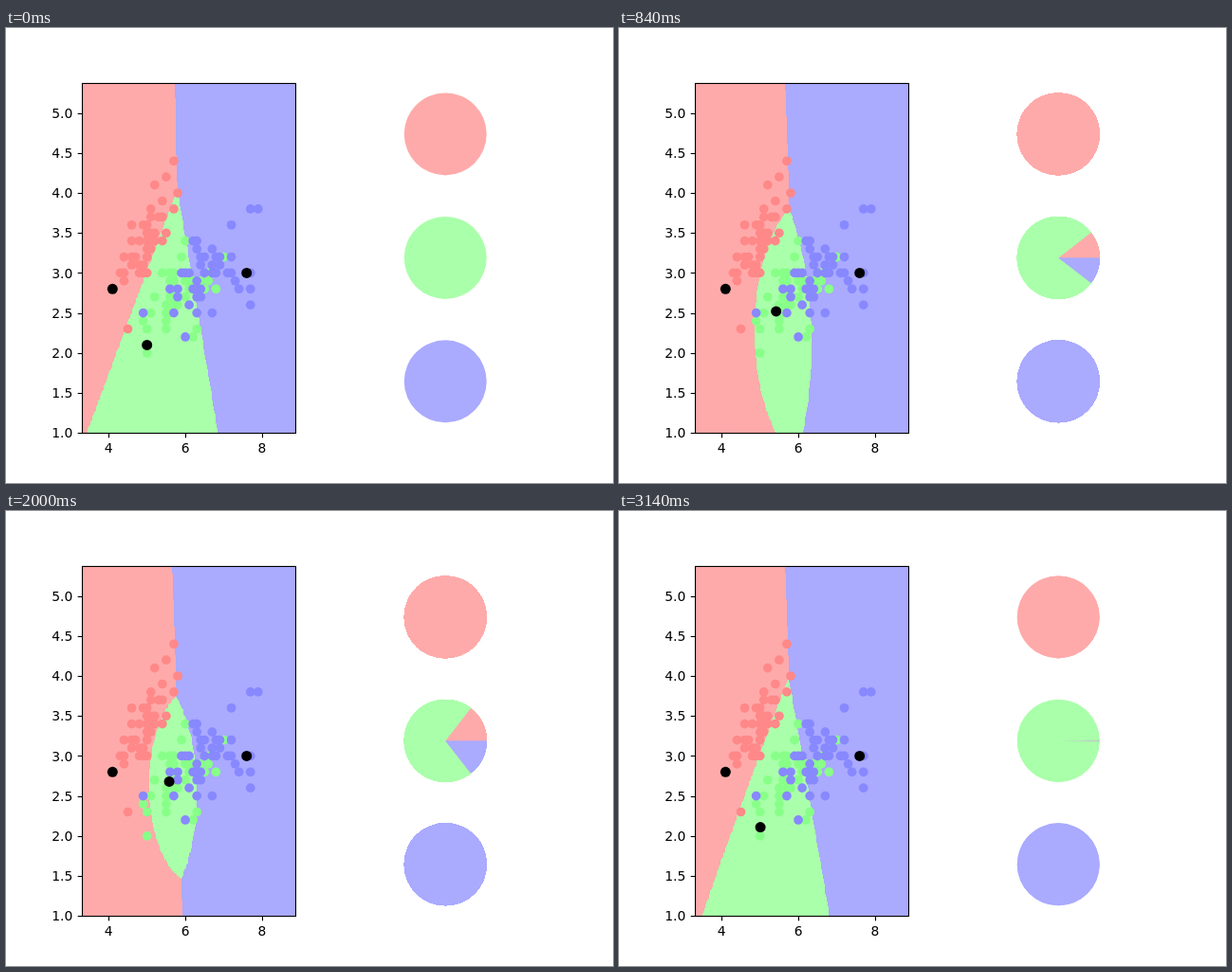
Animation, 640 px wide and 480 px high, one loop 3.16 s. Source, as an HTML page with a canvas:

```html
<!DOCTYPE html>
<html lang="en">
<head>
<meta charset="utf-8">
<title>Soft-label prototypes on iris</title>
<style>
  html, body { margin: 0; width: 100%; height: 100%; overflow: hidden; background: #fff; }
  canvas { display: block; }
</style>
</head>
<body>
<canvas id="stage" width="640" height="480"></canvas>
<script>
const ctx = document.getElementById('stage').getContext('2d');

const LOOP = 3160, STEP = 20, FRAMES = LOOP / STEP;
const LIGHT = ['#ffaaaa', '#aaffaa', '#aaaaff'];
const STRONG = ['#ff8888', '#88ff88', '#8888ff'];

// Plot area in pixels and in data units
const AREA = { x: 80, y: 57.6, w: 225.45, h: 369.6 };
const X0 = 3.3, Y0 = 1, CELL = 0.02, COLS = 279, ROWS = 219;
const px = x => AREA.x + (x - X0) * AREA.w / (COLS * CELL);
const py = y => AREA.y + AREA.h - (y - Y0) * AREA.h / (ROWS * CELL);
const snap = v => Math.round(v) + 0.5;

// Iris sepals in tenths of a centimetre, per species: width -> lengths
const SPECIES = [
  {
    23: [45], 29: [44], 30: [43, 44, 48, 49, 50], 31: [46, 48, 49], 32: [44, 46, 47, 50],
    33: [50, 51], 34: [46, 48, 50, 51, 52, 54], 35: [50, 51, 52, 55], 36: [46, 49, 50],
    37: [51, 53, 54], 38: [51, 57], 39: [54], 40: [58], 41: [52], 42: [55], 44: [57]
  },
  {
    20: [50], 22: [62], 23: [50, 55, 63], 24: [49, 55], 25: [51, 55, 56], 26: [55, 57, 58],
    27: [52, 56, 60], 28: [57, 61, 65, 68], 29: [56, 57, 60, 61, 62, 64, 66],
    30: [54, 56, 57, 66], 32: [59, 70], 34: [60]
  },
  {
    22: [60], 25: [49, 57, 63, 67], 26: [61, 77], 27: [58, 63, 64],
    28: [56, 58, 62, 63, 64, 74, 77], 29: [63, 73],
    30: [59, 60, 61, 65, 67, 68, 71, 72, 76, 77], 31: [64, 67, 69],
    32: [64, 65, 68, 69, 72], 33: [63, 67], 34: [62, 63], 36: [72], 38: [77, 79]
  }
];

const RED = [4.1, 2.8], BLUE = [7.6, 3];
const movingPrototype = k => [5 + 0.01 * k, 2.1 + 0.01 * k];
const sideShare = k => 0.0025 * k;

const mesh = document.createElement('canvas');
mesh.width = COLS;
mesh.height = ROWS;
const meshCtx = mesh.getContext('2d');
const image = meshCtx.createImageData(COLS, ROWS);

// Each cell takes the class with the largest inverse-distance weighted label
function drawRegions(k) {
  const [gx, gy] = movingPrototype(k);
  const share = sideShare(k);
  const blueX = k ? BLUE[0] - 0.1 : BLUE[0];
  let i = 0;
  for (let row = ROWS - 1; row >= 0; row--) {
    const y = Y0 + row * CELL;
    for (let col = 0; col < COLS; col++, i += 4) {
      const x = X0 + col * CELL;
      const near = 1 / Math.hypot(x - gx, y - gy);
      const red = 1 / Math.hypot(x - RED[0], y - RED[1]) + share * near;
      const blue = 1 / Math.hypot(x - blueX, y - BLUE[1]) + share * near;
      const green = (1 - 2 * share) * near;
      const best = red >= green && red >= blue ? 0 : green >= blue ? 1 : 2;
      for (let c = 0; c < 3; c++) image.data[i + c] = c === best ? 255 : 170;
      image.data[i + 3] = 255;
    }
  }
  meshCtx.putImageData(image, 0, 0);
  ctx.imageSmoothingEnabled = false;
  ctx.drawImage(mesh, AREA.x, AREA.y, AREA.w, AREA.h);
}

function dot(x, y, r, color) {
  ctx.fillStyle = color;
  ctx.beginPath();
  ctx.arc(px(x), py(y), r, 0, 2 * Math.PI);
  ctx.fill();
}

function drawPoints(k) {
  SPECIES.forEach((rows, s) => {
    for (const width in rows)
      for (const length of rows[width]) dot(length / 10, width / 10, 4.86, STRONG[s]);
  });
  for (const [x, y] of [RED, movingPrototype(k), BLUE]) dot(x, y, 5.5, '#000');
}

function line(x1, y1, x2, y2) {
  ctx.beginPath();
  ctx.moveTo(x1, y1);
  ctx.lineTo(x2, y2);
  ctx.stroke();
}

function drawAxes() {
  const left = 80.5, right = 305.5, top = 58.5, bottom = 427.5;
  ctx.strokeStyle = ctx.fillStyle = '#000';
  ctx.lineWidth = 1.11;
  ctx.strokeRect(left, top, right - left, bottom - top);
  ctx.font = '13.89px "DejaVu Sans", sans-serif';
  ctx.textAlign = 'center';
  for (const v of [4, 6, 8]) {
    line(snap(px(v)), bottom, snap(px(v)), bottom + 4.86);
    ctx.fillText(v, px(v), 447.5);
  }
  ctx.textAlign = 'right';
  for (let v = 1; v <= 5; v += 0.5) {
    line(left, snap(py(v)), left - 4.86, snap(py(v)));
    ctx.fillText(v.toFixed(1), 70.3, Math.round(py(v) + 5.2));
  }
}

function drawPie(cy, shares) {
  const cx = 463.27, turn = 2 * Math.PI;
  let start = 0;
  shares.forEach((share, s) => {
    if (!share) return;
    const end = start + share;
    ctx.fillStyle = LIGHT[s];
    ctx.beginPath();
    ctx.moveTo(cx, cy);
    ctx.arc(cx, cy, 43.48, -start * turn, -end * turn, true);
    ctx.closePath();
    ctx.fill();
    start = end;
  });
}

// Pies are layered over the earlier ones, which hardens their edges
function drawPies(k) {
  for (let j = 0; j <= k; j++) {
    const share = sideShare(j);
    drawPie(111.95, [1, 0, 0]);
    drawPie(242.4, [share, 1 - 2 * share, share]);
    drawPie(372.85, [0, 0, 1]);
  }
}

function draw(k) {
  ctx.fillStyle = '#fff';
  ctx.fillRect(0, 0, 640, 480);
  drawRegions(k);
  drawPoints(k);
  drawAxes();
  drawPies(k);
}

let origin, shown = -1;
function tick(now) {
  origin ??= now;
  const frame = Math.floor(((now - origin) % LOOP) / STEP + 1e-6) % FRAMES;
  const k = Math.min(frame, FRAMES - frame);
  if (k !== shown) draw(shown = k);
  requestAnimationFrame(tick);
}
draw(shown = 0);
requestAnimationFrame(tick);
</script>
</body>
</html>
```
